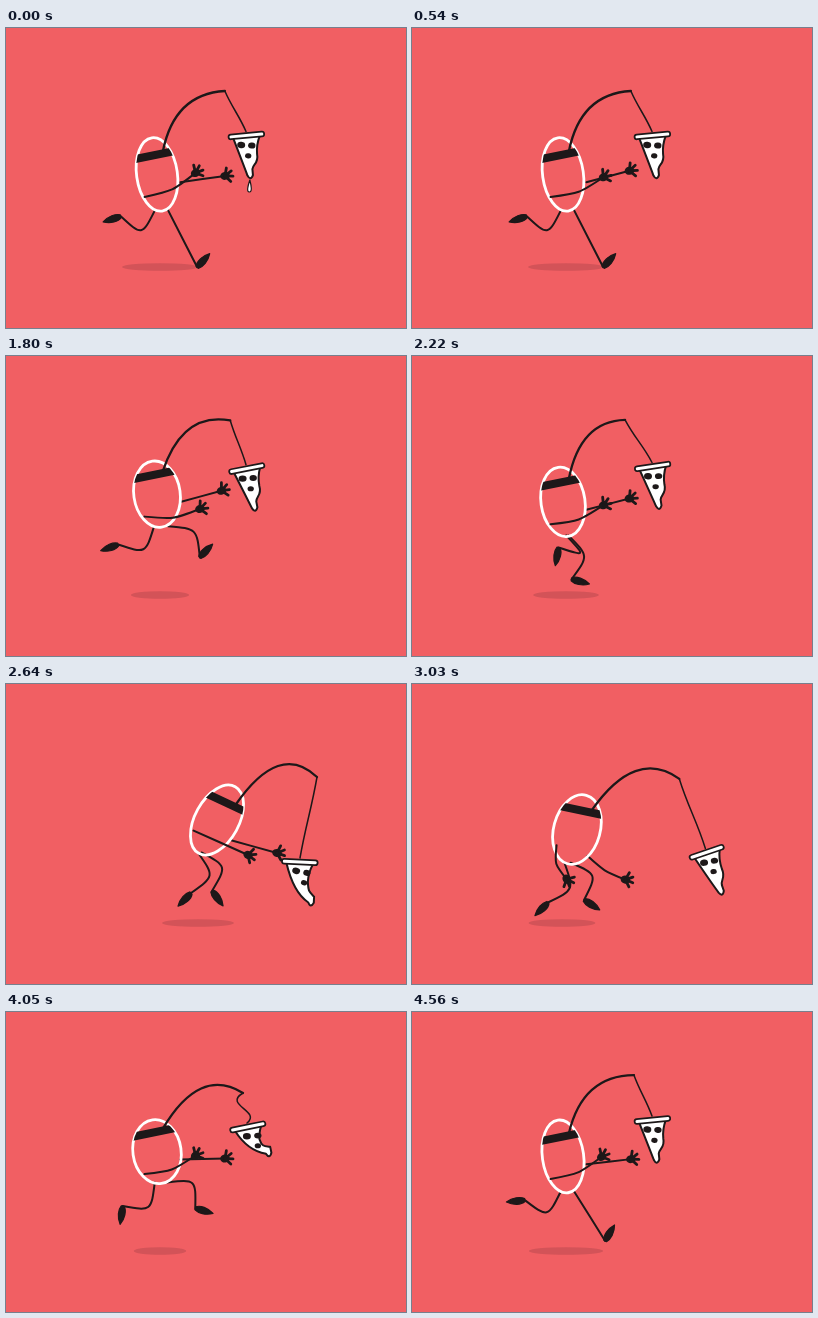
An HTML page with a canvas that plays this animation: 400 px wide and 300 px high, repeating every 4.59 s.

```html
<!DOCTYPE html>
<html lang="en">
<head>
<meta charset="utf-8">
<title>Pizza chase</title>
<style>
  html, body { margin: 0; height: 100%; overflow: hidden; background: #f15f63; }
  canvas { display: block; }
</style>
</head>
<body>
<canvas width="400" height="300"></canvas>
<script>
const LOOP = 4590, INK = '#1d1819', WHITE = '#fff', CORAL = '#f15f63', SHADE = '#d35358';
const SHIN = 29;
const { sin, cos, tanh, exp, sqrt, hypot, max, PI } = Math;
const ctx = document.querySelector('canvas').getContext('2d');

const lerp = (a, b, k) => a + (b - a) * k;
const ease = k => k * k * (3 - 2 * k);

function mix(a, b, k) {
  if (typeof a === 'number') return lerp(a, b, k);
  if (Array.isArray(a)) return a.map((v, i) => mix(v, b[i], k));
  return Object.fromEntries(Object.keys(a).map(key => [key, mix(a[key], b[key], k)]));
}

// Heel position and foot angle; a full turn of the angle is two steps
function stride(angle) {
  const x = 42 * tanh(2.2 * cos(angle + .79));
  const stance = exp(3.2 * (cos(angle - .2) - 1));
  return [153 + x, 192 + .1 * x + 46 * stance, 1 - 2.1 * cos(angle + .5)];
}

function run(t) {
  const early = t < 3000;
  const step = early ? t / 270 : (t - LOOP) / 348;
  const c = cos(2 * PI * step), s = sin(2 * PI * step);
  const y = 142.5 + 4.8 * cos(2 * PI * (step - .1));
  const wave = cos(2 * PI * (early ? t / 690 : (t - LOOP) / 540));
  const lift = (y - 147) * .2;
  return {
    body: [151, y, 22.3 - 1.9 * c, 34.5 + 2.5 * c, -.14],
    rod: [219 - 6 * s, 64 - c],
    pizza: [240, 107 - 3.5 * c, -.16 + .07 * c, 0, 47, 0],
    shadow: [154, 32 + 6 * c],
    near: [192 - 2.5 * wave, 150.5 - 5.5 * wave + lift, 5, -.35 - .15 * wave],
    far: [217 + 2 * wave, 141.5 + 6.5 * wave + lift, 0, -.2 + .1 * wave],
    feet: [stride(PI * step), stride(PI * (step + 1))],
    slump: 0
  };
}

// body: x, y, rx, ry, lean; pizza: x, y, turn, tip x, tip y, string sag;
// hands: x, y, elbow bend, angle; feet: heel x, y, angle
const lunge = {
  body: [211, 136, 22, 38, .5], rod: [311, 93], pizza: [294, 174, .05, 13, 47, 0],
  shadow: [192, 36], near: [242, 171, 0, .5], far: [271, 169, 0, .2],
  feet: [[185, 209, 2.35], [206, 207, .93]], slump: 0
};
const tired = {
  body: [108, 137, 24.5, 33, .04], rod: [199, 73], pizza: [228, 150, -.21, 1.5, 50, 0],
  shadow: [97, 31], near: [57, 201, 11, 1.6], far: [145, 204, 6, .3],
  feet: [[76, 210, 2.35], [127, 207, .2]], slump: 1
};

function shift(pose, dx, dy) {
  const move = ([x, y, ...rest]) => [x + dx, y + dy, ...rest];
  const { body, rod, pizza, near, far, feet, shadow } = pose;
  return {
    ...pose, body: move(body), rod: move(rod), pizza: move(pizza), near: move(near),
    far: move(far), feet: feet.map(move), shadow: [shadow[0] + dx, shadow[1]]
  };
}

const stretch = { ...shift(lunge, 20, 7), rod: [345, 106], pizza: [368, 168, -.45, 0, 48, 0] };
const stagger = shift(tired, -8, 11);
const slack = t => ({ ...run(t), rod: [237, 81], pizza: [241, 111, -.2, 15, 37, 9] });

const TIMELINE = [
  [0, run], [2220, run], [2640, () => lunge], [2850, () => stretch], [3210, () => stagger],
  [3420, () => tired], [3780, run], [3900, run], [4050, slack], [4260, run], [LOOP, run]
];

function poseAt(t) {
  const i = TIMELINE.findLastIndex(k => k[0] <= t);
  const [t0, a] = TIMELINE[i], [t1, b] = TIMELINE[i + 1];
  return mix(a(t), b(t), ease((t - t0) / (t1 - t0)));
}

// Point on the body, given in its leaning frame
function onBody([x, y, , , lean], dx, dy) {
  return [x + dx * cos(lean) - dy * sin(lean), y + dx * sin(lean) + dy * cos(lean)];
}

function stroke(width, color = INK) {
  ctx.lineWidth = width;
  ctx.strokeStyle = color;
  ctx.stroke();
}

function fill(color) {
  ctx.fillStyle = color;
  ctx.fill();
}

function ellipse(x, y, rx, ry, turn = 0) {
  ctx.beginPath();
  ctx.ellipse(x, y, rx, ry, turn, 0, 7);
}

function line(x0, y0, x1, y1, width, color) {
  ctx.beginPath();
  ctx.moveTo(x0, y0);
  ctx.lineTo(x1, y1);
  stroke(width, color);
}

// Two-part limb whose joint sits off the middle by the given bend
function limb(x0, y0, x1, y1, bend) {
  const d = hypot(x1 - x0, y1 - y0) || 1;
  const jx = (x0 + x1) / 2 - (y1 - y0) / d * bend;
  const jy = (y0 + y1) / 2 + (x1 - x0) / d * bend;
  ctx.beginPath();
  ctx.moveTo(x0, y0);
  ctx.bezierCurveTo(jx, jy, jx, jy, x1, y1);
  stroke(2);
}

function drawArm(shoulder, [x, y, bend, angle]) {
  limb(...shoulder, x, y, bend * 1.33);
  ellipse(x, y, 4.8, 4, angle);
  fill(INK);
  for (let i = 0; i < 4; i++) {
    const a = angle - 1.3 + i * .72;
    line(x, y, x + 8 * cos(a), y + 8 * sin(a), 2.8);
  }
}

function drawLeg(hip, [x, y, angle]) {
  const hx = lerp(hip[0], x, .17), hy = hip[1];
  const half = hypot(x - hx, y - hy) / 2;
  limb(hx, hy, x, y, -sqrt(max(0, SHIN * SHIN - half * half)));
  ctx.save();
  ctx.translate(x, y);
  ctx.rotate(angle);
  ctx.beginPath();
  ctx.moveTo(0, -1.5);
  ctx.bezierCurveTo(4, -4.5, 12, -4, 18.5, 0);
  ctx.bezierCurveTo(12, 4, 4, 4, 0, 1.5);
  ctx.closePath();
  fill(INK);
  stroke(1.2);
  ctx.restore();
}

function drawBody([x, y, rx, ry, lean]) {
  ctx.save();
  ctx.translate(x, y);
  ctx.rotate(lean);
  ellipse(0, 0, rx, ry);
  stroke(2.8, WHITE);
  ctx.clip();
  ctx.rotate(-.06);
  ctx.fillStyle = INK;
  ctx.fillRect(-40, -23.5, 80, 8);
  ctx.restore();
}

// The rod bows further the closer its tip comes to the height of its base
function drawRod([x0, y0], [x1, y1], [px, py, , , , sag]) {
  const rise = y0 - y1;
  ctx.beginPath();
  ctx.moveTo(x0, y0);
  ctx.quadraticCurveTo(lerp(x0, x1, .85 - .011 * rise), y1 + 1.2 * (rise - 58), x1, y1);
  stroke(2.3);
  ctx.beginPath();
  ctx.moveTo(x1, y1);
  ctx.bezierCurveTo(lerp(x1, px, .33) - 2.4 * sag, lerp(y1, py, .4),
    lerp(x1, px, .67) + 1.8 * sag, lerp(y1, py, .6), px, py);
  stroke(1.5);
}

function drawPizza([x, y, turn, tx, ty]) {
  ctx.save();
  ctx.translate(x, y);
  ctx.rotate(turn);
  ctx.beginPath();
  ctx.moveTo(-13.5, 5);
  ctx.quadraticCurveTo(-5, ty * .74, tx - 2.5, ty - 3);
  ctx.quadraticCurveTo(tx, ty + 3, tx + 3, ty - 3);
  ctx.lineTo(tx + 3, ty - 9);
  ctx.bezierCurveTo(tx * .5 + 4, ty * .7, 10, ty * .7, 9, ty * .5);
  ctx.quadraticCurveTo(9, 14, 13.5, 5);
  ctx.closePath();
  fill(WHITE);
  stroke(2);
  for (const [dx, dy, r] of [[-6, 13, 4], [4.5, 14.5, 3.7], [0, 24.5, 3.2]]) {
    ellipse(dx + tx * dy / 60, dy, r, r * .8, .2);
    fill(INK);
  }
  line(-15.5, 4, 15.5, 4, 6.5);
  line(-15.5, 4, 15.5, 4, 3, WHITE);
  ctx.restore();
}

function drawDrips(t) {
  if (t < 240) {
    const x = 243.5 - t * .15, y = 158 + t * t * .0012;
    ctx.beginPath();
    ctx.moveTo(x + .5, y - 6);
    ctx.bezierCurveTo(x + 2, y, x + 3, y + 6, x, y + 6);
    ctx.bezierCurveTo(x - 3, y + 6, x - 1.5, y, x + .5, y - 6);
    fill(WHITE);
    stroke(1.2);
  }
  if (t >= 3270 && t < 3465) {
    ellipse(31.5 + 3420 - t, 246.5, 6.3, 1.5);
    fill(WHITE);
    stroke(1.2);
  }
}

function draw(t) {
  ctx.fillStyle = CORAL;
  ctx.fillRect(0, 0, 400, 300);
  const { body, rod, pizza, shadow, near, far, feet, slump } = poseAt(t);
  const hip = onBody(body, 0, body[3] - 1);
  ellipse(shadow[0], 239, shadow[1], 3.8);
  fill(SHADE);
  drawArm(onBody(body, 22 - 10 * slump, 11 + 23 * slump), far);
  feet.forEach(foot => drawLeg(hip, foot));
  drawBody(body);
  drawRod(onBody(body, 9, -22), rod, pizza);
  drawArm(onBody(body, -15.5, 20.5), near);
  drawPizza(pizza);
  drawDrips(t);
}

ctx.lineCap = ctx.lineJoin = 'round';
const start = performance.now();
function tick() {
  draw((performance.now() - start) % LOOP);
  requestAnimationFrame(tick);
}
tick();
</script>
</body>
</html>
```
